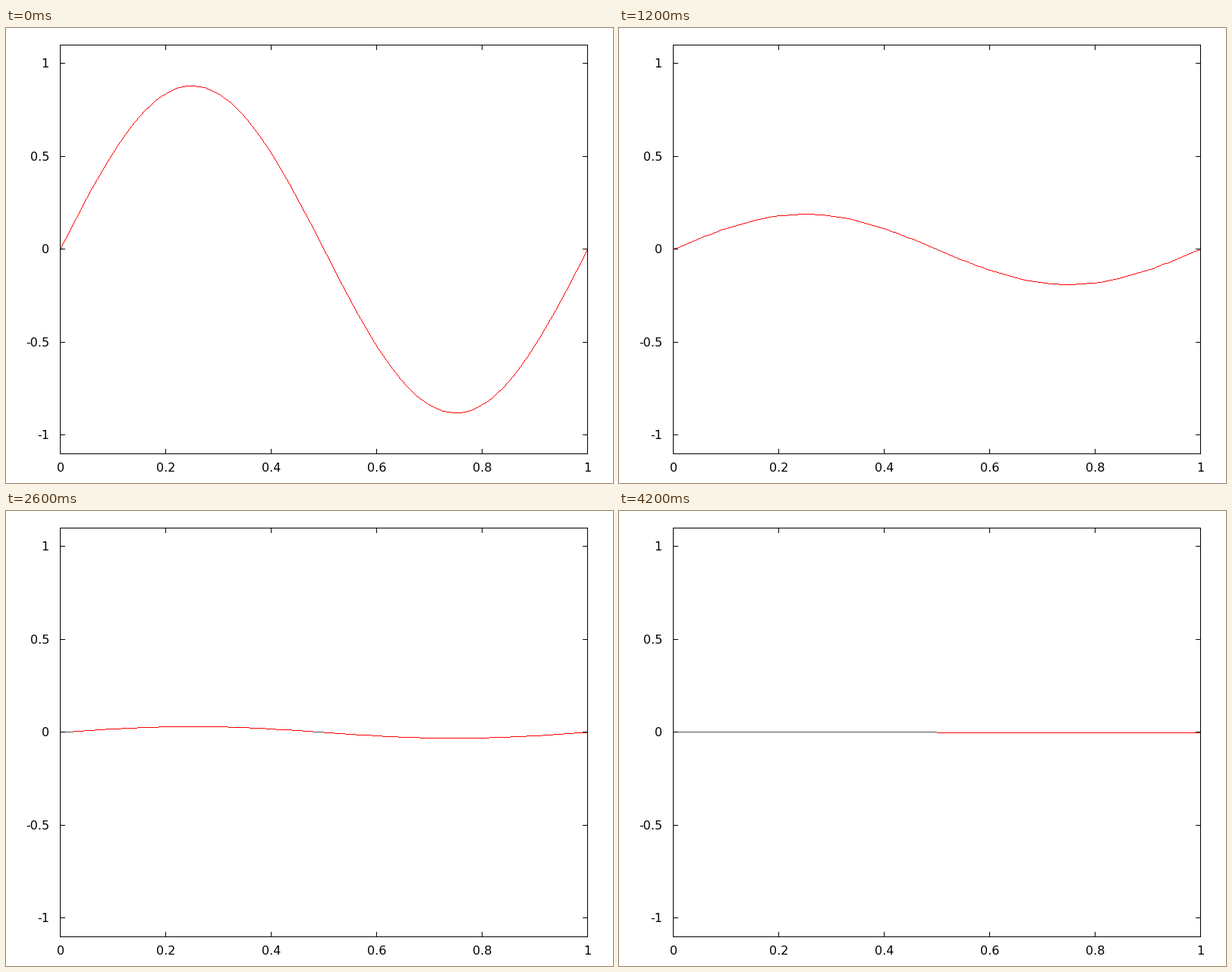
A matplotlib script that plays this animation: 800x600 px, repeating every 7200 ms.

```python
import numpy as np
import matplotlib.pyplot as plt
from matplotlib.animation import FuncAnimation
from matplotlib.collections import PolyCollection
from matplotlib.patches import Rectangle

W, H, DPI = 800, 600, 100
LEFT, RIGHT, TOP, BOTTOM = 71, 766, 22, 561   # border pixel columns and rows
ZERO, UNIT = 291, 245                         # row of y = 0, pixels per unit
SEGMENTS = 99
DECAY = 0.1282                                # amplitude loss per step
STEP_MS, LAST, FRAMES = 100, 42, 72
TICK = 7
RED, GREY = "#ff0000", "#505050"

fig = plt.figure(figsize=(W / DPI, H / DPI), dpi=DPI, facecolor="white")
ax = fig.add_axes([0, 0, 1, 1])
ax.set_xlim(0, W)
ax.set_ylim(H, 0)
ax.axis("off")


def bar(x, y, w, h):
    ax.add_patch(Rectangle((x, y), w, h, fc="black", lw=0, aa=False, zorder=3))


def label(x, y, text, ha):
    ax.text(x, y, text, ha=ha, va="baseline", color="black",
            family="DejaVu Sans", size=16 * 72 / DPI)


def draw_frame():
    width, height = RIGHT - LEFT + 1, BOTTOM - TOP + 1
    for y in (TOP, BOTTOM):
        bar(LEFT, y, width, 1)
    for x in (LEFT, RIGHT):
        bar(x, TOP, 1, height)
    for i in range(6):
        x = LEFT + 139 * i
        bar(x, TOP, 1, TICK)
        bar(x, BOTTOM + 1 - TICK, 1, TICK)
        label(x + 0.8, 585, f"{i / 5:g}", "center")
    for v in (1, 0.5, 0, -0.5, -1):
        y = int(ZERO + 0.5 - UNIT * v)
        bar(LEFT, y, TICK, 1)
        bar(RIGHT + 1 - TICK, y, TICK, 1)
        label(57, y + 6, f"{v:g}", "right")


def nearest(a):
    return np.floor(a + 0.5).astype(int)


def curve_pixels(amp):
    """Columns and rows of a one-pixel line through the sampled sine."""
    t = np.arange(SEGMENTS + 1) / SEGMENTS
    cols = nearest(LEFT + (RIGHT - LEFT) * t)
    rows = ZERO - np.floor(UNIT * amp * np.sin(2 * np.pi * t)).astype(int)
    xs, ys = [], []
    for x0, x1, y0, y1 in zip(cols, cols[1:], rows, rows[1:]):
        n = max(x1 - x0, abs(y1 - y0)) + 1
        xs.append(nearest(np.linspace(x0, x1, n)))
        ys.append(nearest(np.linspace(y0, y1, n)))
    return np.unique(np.column_stack([np.concatenate(xs), np.concatenate(ys)]), axis=0)


draw_frame()
corners = np.array([(0, 0), (1, 0), (1, 1), (0, 1)])
curve, baseline = (
    ax.add_collection(PolyCollection([], facecolors=c, linewidths=0,
                                     antialiaseds=False, zorder=2),
                      autolim=False)
    for c in (RED, GREY))


def update(frame):
    step = min(frame, LAST)
    pixels = curve_pixels(np.exp(-DECAY * (step + 1)))
    squares = pixels[:, None, :] + corners
    flat = pixels[:, 1] == ZERO
    curve.set_verts(squares[~flat])
    baseline.set_verts(squares[flat])
    return curve, baseline


anim = FuncAnimation(fig, update, frames=FRAMES, interval=STEP_MS,
                     init_func=lambda: update(0), repeat=True, repeat_delay=0)
plt.show()
```
